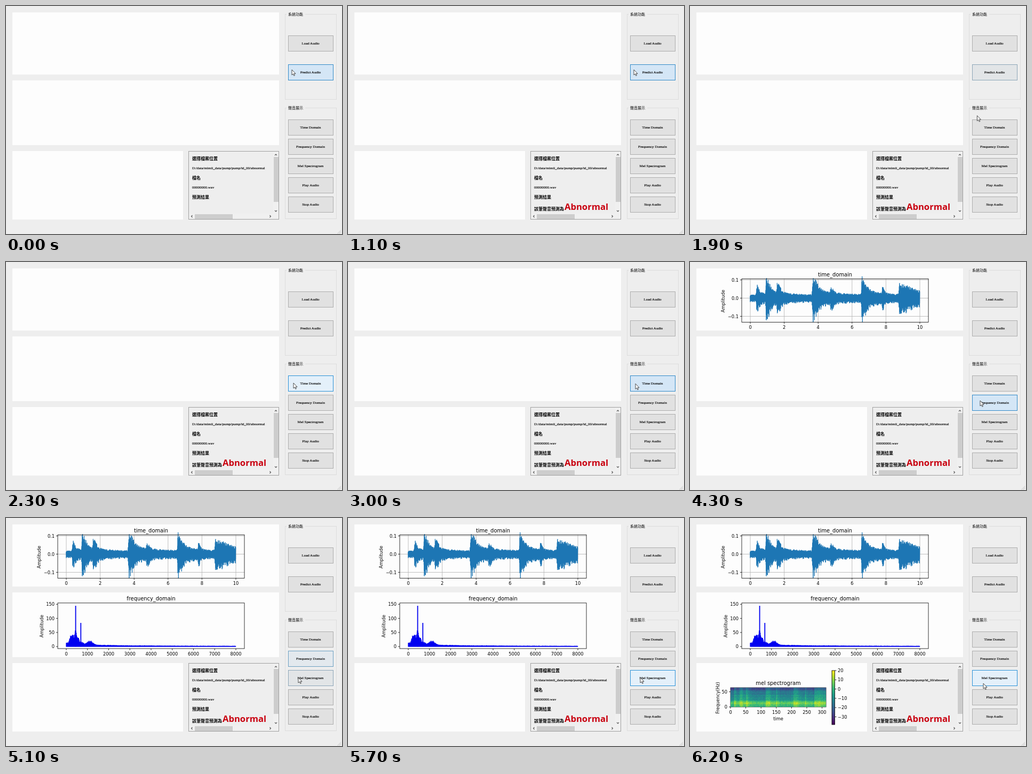
Write an HTML page with a canvas that moves like this. It is 630 px wide and 426 px high and loops after 6300 ms.

```html
<!DOCTYPE html>
<html lang="zh-TW">
<head>
<meta charset="utf-8">
<title>Audio prediction tool</title>
<style>
  html, body { margin: 0; width: 630px; height: 426px; overflow: hidden; background: #eee; }
  svg, canvas { position: absolute; left: 0; top: 0; }
  #mel { left: 76px; top: 317px; }
  text { white-space: pre; }
  .ui { font: 7px "Liberation Serif", "Noto Serif", serif; stroke: #000; stroke-width: .15px; }
  .group { font: 500 7px "Noto Sans CJK TC", "Noto Sans CJK JP", sans-serif; }
  .head { font: bold 8px "Noto Sans CJK TC", "Noto Sans CJK JP", sans-serif; }
  .result { font: bold 16.6px "Open Sans", "Noto Sans", sans-serif; fill: #c9000f; }
  .tick { font: 8.25px "DejaVu Sans", sans-serif; }
  .title { font: 9.9px "DejaVu Sans", sans-serif; }
  .mid { text-anchor: middle; }
  .end { text-anchor: end; }
</style>
</head>
<body>
<svg id="stage" width="630" height="426" viewBox="0 0 630 426"></svg>
<canvas id="mel" width="179" height="36"></canvas>
<script>
const LOOP = 6300, STEP = 100;
const $ = id => document.getElementById(id);

let seed = 7;
const rand = () => (seed = (seed * 16807) % 2147483647) / 2147483647;
const clamp = v => Math.max(0, Math.min(1, v));
const ramp = (t, from, to) => clamp((t - from) / (to - from));
const ease = k => k * k * (3 - 2 * k);
const mix = (a, b, k) => a.map((v, i) => v + (b[i] - v) * k);
const bell = x => Math.exp(-x * x);

// SVG helpers
const rect = (x, y, w, h, fill, more = '') =>
  `<rect x="${x}" y="${y}" width="${w}" height="${h}" fill="${fill}" ${more}/>`;
const frame = (x, y, w, h, fill, stroke, more = '') =>
  rect(x + .5, y + .5, w - 1, h - 1, fill, `stroke="${stroke}" ${more}`);
const text = (x, y, cls, str, more = '') =>
  `<text x="${x}" y="${y}" class="${cls}" ${more}>${str}</text>`;
const path = (d, stroke, width = 1, more = '') =>
  `<path d="${d}" fill="none" stroke="${stroke}" stroke-width="${width}" ${more}/>`;

// Evenly spaced ticks as rows of [position, label]
const ticks = (n, from, gap, label) =>
  Array.from({ length: n }, (_, i) => [from + gap * i, String(label(i)).replace('-', '−')]);

function axes(x, y, w, h, title, xTicks, yTicks) {
  let out = text(x + w / 2, y - 4.6, 'title mid', title);
  for (const [p, s] of xTicks)
    out += path(`M${p} ${y + h}v3`, '#000', .8) + text(p, y + h + 12.9, 'tick mid', s);
  for (const [p, s] of yTicks)
    out += path(`M${x} ${p}h-3`, '#000', .8) + text(x - 6, p + 3, 'tick end', s);
  return out + rect(x, y, w, h, 'none', 'stroke="#000" stroke-width=".8"');
}
const sideLabel = (x, y, s) =>
  text(0, 0, 'tick mid', s, `transform="translate(${x} ${y}) rotate(-90)"`);

// Loudness over ten seconds: a steady hum plus [start, height, length] knocks with slow tails
const knocks = [[.4, .06, .15], [.95, .105, .25], [1.6, .08, .2], [3.7, .11, .35],
  [4.75, .05, .2], [6.6, .11, .3], [7.8, .05, .12], [8.8, .07, .9]];
const loudness = t => .021 + Math.max(...knocks.map(([start, height, length]) => {
  const d = t - start;
  return height * (d < 0 ? bell(d / .04) : .55 * bell(d / length) + .4 * Math.exp(-d / length / 3));
}));

function timePlot() {
  const xt = ticks(6, 113, 63.6, i => 2 * i);
  const yt = ticks(3, 33.5, 34, i => ((1 - i) / 10).toFixed(1));
  let grid = '', wave = 'M113 67.5';
  for (const [p] of xt) grid += `M${p} 31.5v81`;
  for (const [p] of yt) grid += `M97 ${p}h350`;
  for (let x = 113; x <= 431; x += .3) {
    const a = loudness((x - 113) / 31.8) * 340;
    const up = a * (.6 + .35 * rand() ** 2), down = a * (.6 + .5 * rand() ** 3);
    wave += `L${x.toFixed(1)} ${(67.5 - up).toFixed(1)}V${(67.5 + down).toFixed(1)}`;
  }
  return path(grid, '#b0b0b0', .8) + path(wave, '#1f77b4', 1, 'stroke-linejoin="round"') +
    axes(97, 31.5, 350, 81, 'time_domain', xt, yt) + sideLabel(65, 73, 'Amplitude');
}

const spectrum = f => 1.5 + 7 * Math.exp(-f / 2500) + 58 * Math.exp(-Math.abs(f - 430) / 170) +
  18 * bell((f - 230) / 90) + 14 * bell((f - 1130) / 180);

function frequencyPlot() {
  const zero = 240.2, unit = .526;
  let d = `M113 ${zero}`;
  for (let x = 113; x <= 431; x += .3) {
    const v = spectrum((x - 113) / 318 * 8000) * (.5 + .5 * rand());
    d += `L${x.toFixed(1)} ${(zero - v * unit).toFixed(1)}V${zero}`;
  }
  const peaks = `M130.6 ${zero}v${-145 * unit}M140.3 ${zero}v${-84 * unit}`;
  return path(d, '#0000f0', 1.2, 'stroke-linejoin="round"') + path(peaks, '#0000f0', 1.8) +
    axes(97, 158.8, 350, 85.2, 'frequency_domain', ticks(9, 113, 39.75, i => 1000 * i),
      ticks(4, zero, -50 * unit, i => 50 * i)) + sideLabel(70, 202, 'Amplitude');
}

const viridis = ['#440154', '#482878', '#3e4a89', '#31688e', '#26828e',
  '#1f9e89', '#35b779', '#6ece58', '#b5de2b', '#fde725'];

function melPlot() {
  const stops = viridis.map((c, i) => `<stop offset="${i / 9}" stop-color="${c}"/>`).join('');
  let out = `<linearGradient id="bar" x1="0" y1="1" x2="0" y2="0">${stops}</linearGradient>` +
    rect(266, 285, 5.5, 101, 'url(#bar)', 'stroke="#000" stroke-width=".8"');
  for (const [p, s] of ticks(6, 285, 17.3, i => 20 - 10 * i))
    out += path(`M271.5 ${p}h3`, '#000', .8) + text(277, p + 3, 'tick', s);
  return out + axes(76, 317, 179, 36, 'mel spectrogram', ticks(7, 76, 28.6, i => 50 * i),
    ticks(2, 353, -28.3, i => 50 * i)) + sideLabel(55, 336, 'Frequency(Hz)') +
    text(165.5, 377.5, 'tick mid', 'time');
}

function paintMel() {
  const ctx = $('mel').getContext('2d');
  const colors = viridis.map(c => [1, 3, 5].map(k => parseInt(c.slice(k, k + 2), 16)));
  const shade = v => {
    const i = Math.min(8, Math.floor(v * 9));
    return `rgb(${mix(colors[i], colors[i + 1], v * 9 - i)})`;
  };
  const rows = Array.from({ length: 36 }, () => rand() * .1 - .05);
  for (let x = 0; x < 179; x++) {
    const gain = Math.min(.16, (loudness(x / 17.9) - .021) * 3) + rand() * .05;
    for (let y = 0; y < 36; y++) {
      const m = 1 - y / 35;
      const v = .57 - .3 * m + .2 * bell((m - .2) / .11) - (m > .88 ? .08 : 0);
      ctx.fillStyle = shade(clamp(v + gain + rows[y] + (rand() - .5) * .12));
      ctx.fillRect(x, y, 1, 1);
    }
  }
}

// A button with an output shows it on release
const buttons = [
  { y: 55, label: 'Load Audio' },
  { y: 109, label: 'Predict Audio', enter: -900, press: -500, release: 1100, leave: 1600, shows: ['verdict'] },
  { y: 212, label: 'Time Domain', enter: 1900, press: 2800, release: 3100, leave: 3700, shows: ['timePlot'] },
  { y: 248, label: 'Frequency Domain', enter: 3800, press: 4200, release: 4500, leave: 4900, shows: ['freqPlot'] },
  { y: 284, label: 'Mel Spectrogram', enter: 5000, press: 5700, release: 6000, leave: LOOP, shows: ['melPlot', 'mel'] },
  { y: 320, label: 'Play Audio' },
  { y: 356, label: 'Stop Audio' },
];
// Colours at rest, hovered and pressed
const faces = [[225, 225, 225], [228, 240, 250], [212, 230, 246]];
const edges = [[173, 173, 173], [42, 146, 215], [50, 138, 200]];
const blend = ([rest, over, down], hover, press) =>
  `rgb(${mix(mix(rest, over, hover), down, press).map(Math.round)})`;

// Pointer moves: [start, end, x, y]
const home = [536, 119];
const moves = [[1400, 2100, 539, 226], [2800, 3300, 539, 230], [3700, 4100, 544, 259],
  [4800, 5100, 548, 298], [5700, 6200, 550, 309]];
const pointerAt = t => moves.reduce((p, [from, to, x, y]) => mix(p, [x, y], ease(ramp(t, from, to))), home);

const groupBox = (y, h, name) =>
  frame(523, y, 97, h, 'none', '#dcdcdc') + rect(526, y - 3, 35, 7, '#eee') + text(529, y + 2.8, 'group', name);

function infoBox() {
  return frame(342, 271, 170, 128, '#eee', '#a0a0a0') +
    rect(501, 272, 10, 116, '#f0f0f0') + rect(343, 388, 168, 10, '#f0f0f0') +
    rect(502, 282, 9, 84, '#cdcdcd') + rect(354, 389, 71, 9, '#cdcdcd') +
    path('M504 279l2-2 2 2M504 382l2 2 2-2M349.5 391l-2 2 2 2M494.5 391l2 2-2 2', '#555', 1.1) +
    text(349, 288, 'head', '選擇檔案位置') +
    text(349, 305, 'ui', 'D:/data/mimii_data/pump/pump/id_00/abnormal') +
    text(349, 324, 'head', '檔名') + text(349, 341, 'ui', '00000000.wav') +
    text(349, 360, 'head', '預測結果') +
    `<g id="verdict">${text(349, 382, 'head', '該筆聲音預測為')}${text(406, 381, 'result', 'Abnormal')}</g>`;
}

$('stage').innerHTML =
  rect(12, 12, 500, 116, '#fdfdfd') + rect(12, 139, 500, 121, '#fdfdfd') + rect(12, 271, 320, 128, '#fdfdfd') +
  groupBox(15, 160, '系統功能') + groupBox(190, 208, '聲音展示') + infoBox() +
  buttons.map(({ y, label }, i) => frame(529, y, 85, 30, '#e1e1e1', '#adadad', `id="btn${i}"`) +
    text(571, y + 17.3, 'ui mid', label)).join('') +
  `<g id="timePlot">${timePlot()}</g><g id="freqPlot">${frequencyPlot()}</g><g id="melPlot">${melPlot()}</g>` +
  path('M622 425l6-6M625 425l3-3', '#c4c4c4', 1.2, 'stroke-dasharray="1.5 1"') +
  '<path id="pointer" d="M0 0V10L2.3 7.9 3.9 11.4 5.4 10.7 3.9 7.4H7Z" fill="#fff" stroke="#222" stroke-width=".8"/>';
paintMel();

function draw(now) {
  const t = Math.floor(now % LOOP / STEP) * STEP;
  buttons.forEach(({ enter, press, release, leave, shows }, i) => {
    if (!shows) return;
    const hover = ramp(t, enter, enter + 400) - ramp(t, leave, leave + 400);
    const down = ramp(t, press, press + 100) - ramp(t, release, release + 200);
    $('btn' + i).setAttribute('fill', blend(faces, hover, down));
    $('btn' + i).setAttribute('stroke', blend(edges, hover, down));
    for (const id of shows) $(id).style.visibility = t >= release ? 'visible' : 'hidden';
  });
  $('pointer').setAttribute('transform', `translate(${pointerAt(t)})`);
}

const start = performance.now();
function tick() {
  draw(performance.now() - start);
  requestAnimationFrame(tick);
}
tick();
</script>
</body>
</html>
```
